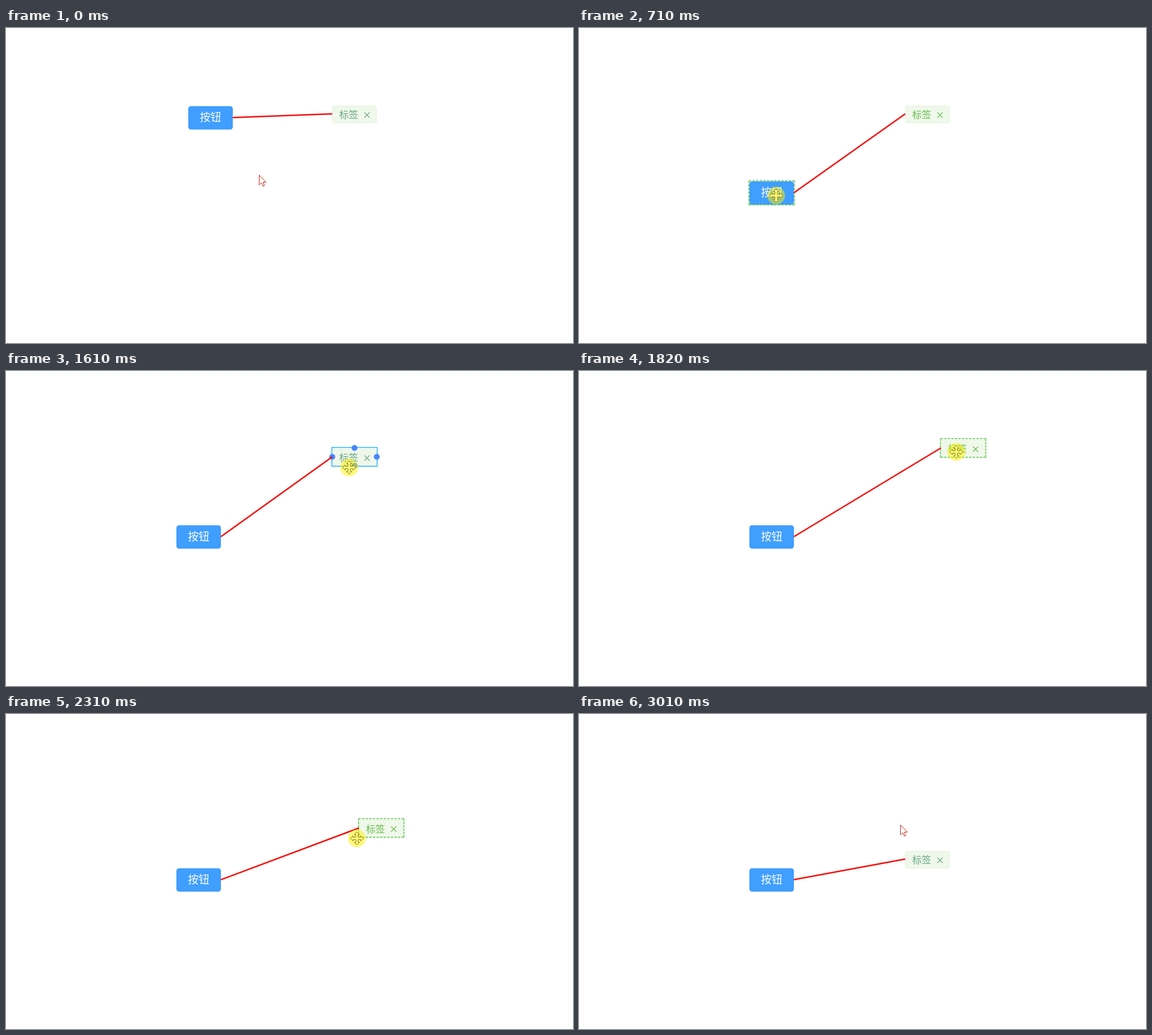
These frames come from a looping animation (955x532 px, 3.56 s). An HTML page with a canvas:

```html
<!DOCTYPE html>
<html lang="zh-CN">
<head>
<meta charset="utf-8">
<title>连线拖拽</title>
<style>
  html, body { margin: 0; width: 100%; height: 100%; overflow: hidden; background: #fff; }
  canvas { display: block; width: 955px; height: 532px; }
</style>
</head>
<body>
<canvas id="stage"></canvas>
<script>
const W = 955, H = 532, LOOP = 3560, STEP = 70;
const FONT = '"Noto Sans CJK SC", "Noto Sans CJK", "Noto Sans CJK JP", sans-serif';
const COLOR = {
  button: '#409eff', tag: '#f0f8eb', tagEdge: '#e3f2da',
  label: '#67a687', labelMoving: '#66bd4c',
  wire: '#f31410', frame: '#2cb9fa', dash: '#5bc84c', dot: '#4a86fb',
  arrow: '#c02c1f', cross: '#1a1a1a', press: 'rgba(255, 240, 0, 0.5)'
};

const canvas = document.getElementById('stage');
const ctx = canvas.getContext('2d');
const dpr = window.devicePixelRatio || 1;
canvas.width = W * dpr;
canvas.height = H * dpr;

const leg = (from, to, x, y) => ({ from, to, x, y });

// A path rests at its start and glides along each leg in turn
function path(x, y, ...legs) {
  return t => legs.reduce((p, l) => {
    const k = Math.min(1, Math.max(0, (t - l.from) / (l.to - l.from)));
    return { x: p.x + (l.x - p.x) * k, y: p.y + (l.y - p.y) * k };
  }, { x, y });
}

const pointerAt = path(426, 248,
  leg(0, 280, 352, 154.5),      // to the button
  leg(490, 700, 332, 283),      // drag it down
  leg(840, 980, 565, 160),      // over to the tag
  leg(980, 1120, 628, 156),
  leg(1120, 1260, 578, 163),
  leg(1610, 2030, 693, 110.5),  // drag it up, then back down
  leg(2100, 2310, 591, 210),
  leg(2310, 2450, 570, 258),
  leg(2520, 2660, 562, 231),    // leave
  leg(2800, 3010, 541, 187));
const buttonAt = path(307, 132, leg(490, 700, 287, 259), leg(700, 770, 287, 260.5));
const tagAt = path(549.5, 130,
  leg(1610, 2030, 669.5, 100),
  leg(2100, 2310, 594.5, 177.5),
  leg(2310, 2450, 549.5, 230));

const DRAGS = [
  { item: 'button', press: 470, drop: 840 },
  { item: 'tag', press: 1610, drop: 2590 }
];

function box(x, y, w, h, r, fill) {
  ctx.beginPath();
  ctx.roundRect(x, y, w, h, r);
  ctx.fillStyle = fill;
  ctx.fill();
}

function disc(x, y, r, fill) {
  ctx.beginPath();
  ctx.arc(x, y, r, 0, Math.PI * 2);
  ctx.fillStyle = fill;
  ctx.fill();
}

function line(x0, y0, x1, y1, color, width) {
  ctx.beginPath();
  ctx.moveTo(x0, y0);
  ctx.lineTo(x1, y1);
  ctx.strokeStyle = color;
  ctx.lineWidth = width;
  ctx.stroke();
}

function label(text, x, y, size, color) {
  ctx.font = `${size}px ${FONT}`;
  ctx.fillStyle = color;
  ctx.fillText(text, x, y);
}

function shape(points, x, y, stroke) {
  ctx.beginPath();
  points.forEach(([px, py]) => ctx.lineTo(x + px, y + py));
  ctx.closePath();
  ctx.fillStyle = '#fff';
  ctx.fill();
  ctx.strokeStyle = stroke;
  ctx.lineWidth = 1;
  ctx.stroke();
}

const ARROW = [[0, 0], [0, 16.5], [3.8, 13], [6.4, 18.8], [8.8, 17.8], [6.4, 12], [11.5, 12]];
const ARM = [[0, -11], [4.5, -6.5], [2, -6.5], [2, -2], [6.5, -2], [6.5, -4.5]];
const CROSS = [0, 1, 2, 3].flatMap(q => ARM.map(([x, y]) =>
  [[x, y], [-y, x], [-x, -y], [y, -x]][q]));

function drawButton({ x, y }) {
  box(x, y, 75, 39.5, 4.5, COLOR.button);
  label('按钮', x + 19.5, y + 25.2, 18, '#fff');
}

function drawTag({ x, y }, color) {
  box(x, y + 1.3, 75, 29.4, 4, COLOR.tagEdge);
  box(x + 1, y + 2.3, 73, 27.4, 3, COLOR.tag);
  label('标签', x + 11.7, y + 22.2, 16, color);
  const cx = x + 58.5, cy = y + 17, r = 4.5;
  line(cx - r, cy - r, cx + r, cy + r, color, 1.1);
  line(cx - r, cy + r, cx + r, cy - r, color, 1.1);
}

// One side of a dashed border, with whole dashes at both corners
function dashedSide(x0, y0, x1, y1) {
  const dash = 4, length = Math.hypot(x1 - x0, y1 - y0);
  const n = Math.round((length - dash) / (dash + 2));
  ctx.setLineDash([dash, (length - dash) / n - dash]);
  line(x0, y0, x1, y1, COLOR.dash, 1.5);
  ctx.setLineDash([]);
}

function drawDashes({ x, y, w, h }) {
  const l = x - 0.8, t = y - 0.8, r = x + w + 0.8, b = y + h + 0.8;
  dashedSide(l, t, r, t);
  dashedSide(l, b, r, b);
  dashedSide(l, t, l, b);
  dashedSide(r, t, r, b);
}

function drawHandles({ x, y, w, h }) {
  ctx.strokeStyle = COLOR.frame;
  ctx.lineWidth = 1.5;
  ctx.strokeRect(x - 0.8, y - 0.8, w + 1.6, h + 1.6);
  for (const [u, v] of [[0, 0.5], [0.5, 0], [1, 0.5], [0.5, 1]]) {
    disc(x + w * u, y + h * v, 5, COLOR.dot);
  }
}

function draw(t) {
  const pointer = pointerAt(t), button = buttonAt(t), tag = tagAt(t);
  const areas = {
    button: { x: button.x, y: button.y - 0.5, w: 75, h: 39.5 },
    tag: { x: tag.x, y: tag.y, w: 75, h: 30 }
  };
  const reach = 5;
  const inside = a => pointer.x > a.x - reach && pointer.x < a.x + a.w + reach &&
    pointer.y > a.y - reach && pointer.y < a.y + a.h + reach;
  const drag = DRAGS.find(d => t >= d.press && t < d.drop);
  const moving = drag && t >= drag.press + STEP;
  const active = drag ? drag.item : Object.keys(areas).find(k => inside(areas[k]));

  ctx.setTransform(dpr, 0, 0, dpr, 0, 0);
  ctx.fillStyle = '#fff';
  ctx.fillRect(0, 0, W, H);
  drawButton(button);
  drawTag(tag, moving ? COLOR.labelMoving : COLOR.label);
  if (active) (moving ? drawDashes : drawHandles)(areas[active]);
  line(button.x + 75, button.y + 19.3, tag.x, tag.y + 15, COLOR.wire, 2.5);

  if (active) shape(CROSS, pointer.x, pointer.y, COLOR.cross);
  else shape(ARROW, pointer.x + 0.5, pointer.y + 0.5, COLOR.arrow);
  if (drag) disc(pointer.x, pointer.y, 15, COLOR.press);
}

const start = performance.now();
function tick() {
  const t = (performance.now() - start) % LOOP;
  draw(Math.floor(t / STEP) * STEP);
  requestAnimationFrame(tick);
}
tick();
</script>
</body>
</html>
```
